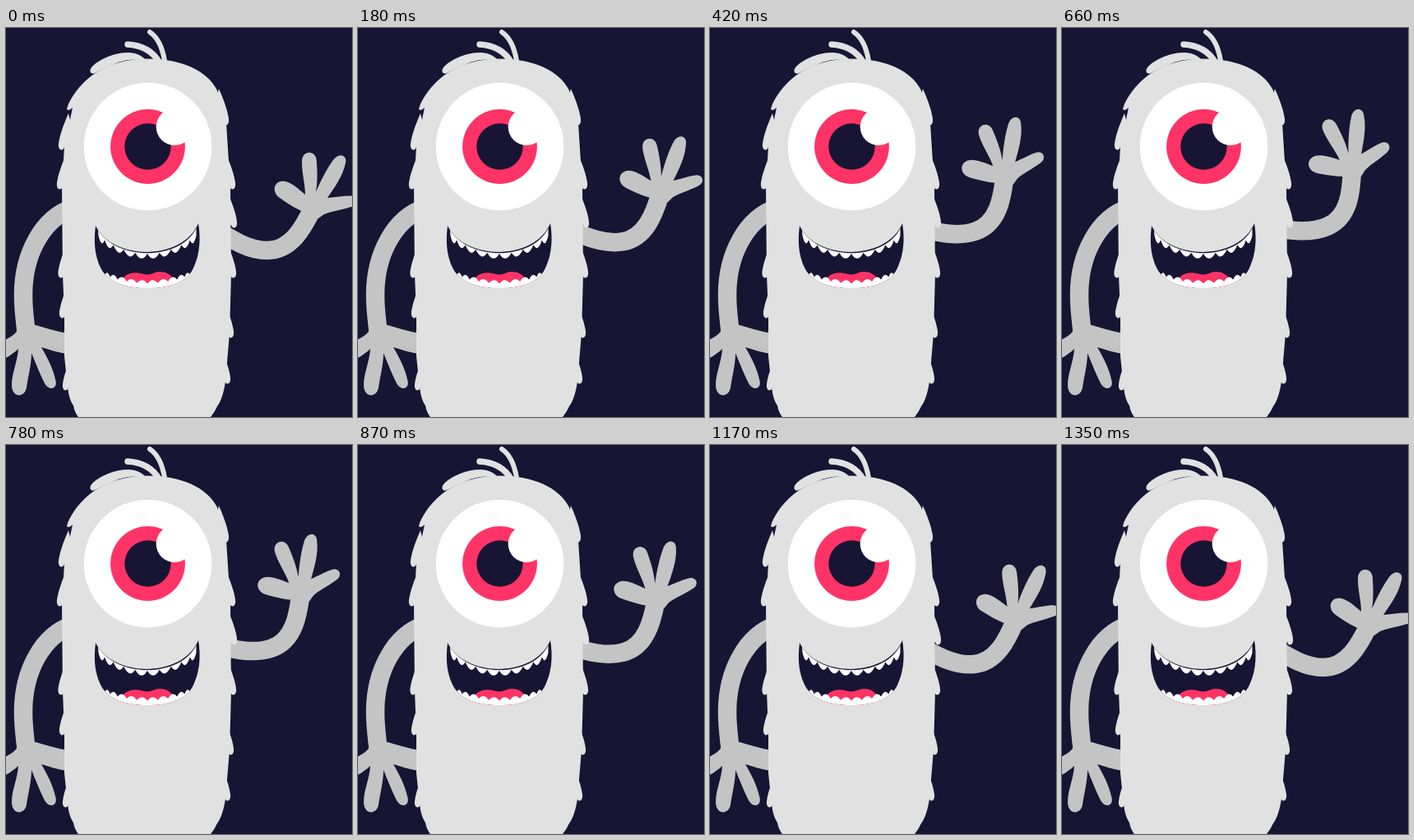
An HTML page for the animation above (1.41 s loop, 421 by 474 pixels).

```html
<!DOCTYPE html>
<html lang="en">
<head>
<meta charset="utf-8">
<title>Waving monster</title>
<style>
  html, body { margin: 0; width: 100%; height: 100%; overflow: hidden; background: #171533; }
  svg { display: block; width: 100vw; height: 100vh; }
  .limb { fill: #c4c4c4; }
  .bone { fill: none; stroke: #c4c4c4; stroke-width: 22.5; }
  .fur { fill: #e1e1e1; }
  .hair { fill: none; stroke: #e1e1e1; stroke-linecap: round; }
  .dark { fill: #171533; }
  .pink { fill: #ff3366; }
  .white { fill: #fff; }
</style>
</head>
<body>
<svg viewBox="0 0 421 474">
  <defs>
    <path id="lips" d="M109 241 C130 284 215 284 234 238 C237 255 236 275 229 290
      C221 312 195 317 172 317 C148 317 124 311 115 292 C107 275 107 258 109 241Z"/>
    <clipPath id="mouth"><use href="#lips"/></clipPath>
  </defs>
  <rect class="dark" width="421" height="474"/>

  <!-- resting arm -->
  <path class="bone" d="M80 220 C45 232 21 275 21 325 C21 345 23 355 25 374"/>
  <path class="limb" d="M14 367 C12 374 4 377 -6 383 V404 C2 402 8 397 15 391
    C14 407 7 420 7 435 C7 451 23 451 25 438 C27 424 31 410 31 396
    C36 408 41 421 46 431 C52 444 64 440 60 428 C57 414 50 401 43 389
    C52 391 62 396 76 397 V372 C62 370 50 366 36 362Z"/>

  <!-- waving arm -->
  <g id="arm">
    <path class="bone" d="M251 243 C268 253 292 271 318 271 C347 271 362 243 373 220"/>
    <path class="limb" d="M362 224 C352 220 340 212 333 207 C324 201 325 189 334 187
      C342 184 354 194 364 203 C364 190 360 178 360 163 C360 148 378 148 378 163
      C379 176 379 190 377 200 C383 186 390 172 398 161 C405 151 416 155 413 165
      C410 180 400 194 391 207 C402 206 412 204 420 204.5 C429 206 428 216 420 218
      C408 222 396 223 387 227 L380 232 H368Z"/>
  </g>

  <!-- body -->
  <path class="fur" d="M103 54 C100 48 112 40 124 35 C142 28 160 28 169 38
    L160 39 C145 36 125 46 110 54 Q105 57 103 54Z"/>
  <path class="hair" stroke-width="7.500" d="M148 20 C166 21 178 28 186 41"/>
  <path class="hair" stroke-width="6" d="M175 5 C184 11 190 22 193 40"/>
  <path class="fur" d="M88 474 C85 470 83 466 82 460 C78 454 76 447 75 437 L71 400 V350
    L69 300 L68 194 L71 145 L81 97 C77 101 73 101 74.500 97 C76 91 79 87 82 82
    C98 58 124 40 165 37.500 C210 36 244 50 257 76 L268 116 L273 194 L274 300
    L272 372 L267 431 C265 445 261 456 257 461 Q254 468 249 474Z"/>
  <g id="tufts" class="fur"></g>

  <!-- eye -->
  <circle class="white" cx="172.500" cy="144.500" r="77.800"/>
  <circle class="pink" cx="172.500" cy="144.500" r="45.400"/>
  <circle class="dark" cx="172.500" cy="144.500" r="28.200"/>
  <circle class="white" cx="205.200" cy="120.500" r="22.500"/>

  <!-- mouth -->
  <use class="dark" href="#lips"/>
  <g clip-path="url(#mouth)">
    <path class="pink" d="M140 308 C145 299 155 297 164 299 Q172 302 180 298.500
      C190 295 198 298 204 306 V318 H140Z"/>
    <path id="upper" class="white"/>
    <path id="lower" class="white"/>
  </g>
</svg>
<script>
const LOOP = 1410, STEP = 30, LAST = 1350, PEAK = 615;
const REACH = 25; // degrees
const PIVOT = "251 244";

const byId = id => document.getElementById(id);

// ten rounded teeth along a parabola, wider towards the middle
function teeth(cx, cy, half, rise, depth) {
  const notch = i => {
    const s = i / 5 - 1, k = 1.25 * s - 0.25 * s ** 3;
    return [cx + half * k, cy - rise * k * k];
  };
  let d = "M" + notch(0);
  for (let i = 1; i <= 10; i++) {
    const [ax, ay] = notch(i - 1), [bx, by] = notch(i);
    d += `Q${(ax + bx) / 2} ${(ay + by) / 2 + 2 * depth} ${bx} ${by}`;
  }
  return d;
}

// tufts of fur, given by outermost x and lowest y
function tufts(side, tips) {
  return tips.map(([x, y]) =>
    `<path transform="translate(${x} ${y}) scale(${side} 1)"
      d="M12 -44 C5 -28 1 -16 0 -7 C-1 1 5 3 7 -3 H22Z"/>`).join("");
}

byId("tufts").innerHTML =
  tufts(1, [[64, 148], [62, 196], [63.5, 304], [65, 353], [69, 441]]) +
  tufts(-1, [[271, 118], [279, 196], [281, 243], [280, 304], [277, 377], [273, 433]]);
byId("upper").setAttribute("d", teeth(172, 275, 59.5, 22, 6.5) + "V244C212 284 135 284 112 246Z");
byId("lower").setAttribute("d", teeth(172, 311.5, 52, 10.5, -4) + "V320H120Z");

function lift(t) {
  if (t < PEAK) return REACH * (1 - (1 - t / PEAK) ** 1.25);
  const v = (t - PEAK) / (LAST - PEAK);
  return REACH * (1 - v ** 1.3) ** 1.75;
}

function draw(ms) {
  const t = Math.min(LAST, Math.floor((ms % LOOP) / STEP) * STEP);
  byId("arm").setAttribute("transform", `rotate(${-lift(t)} ${PIVOT})`);
}

const start = performance.now();
function tick() {
  draw(performance.now() - start);
  requestAnimationFrame(tick);
}
tick();
</script>
</body>
</html>
```
